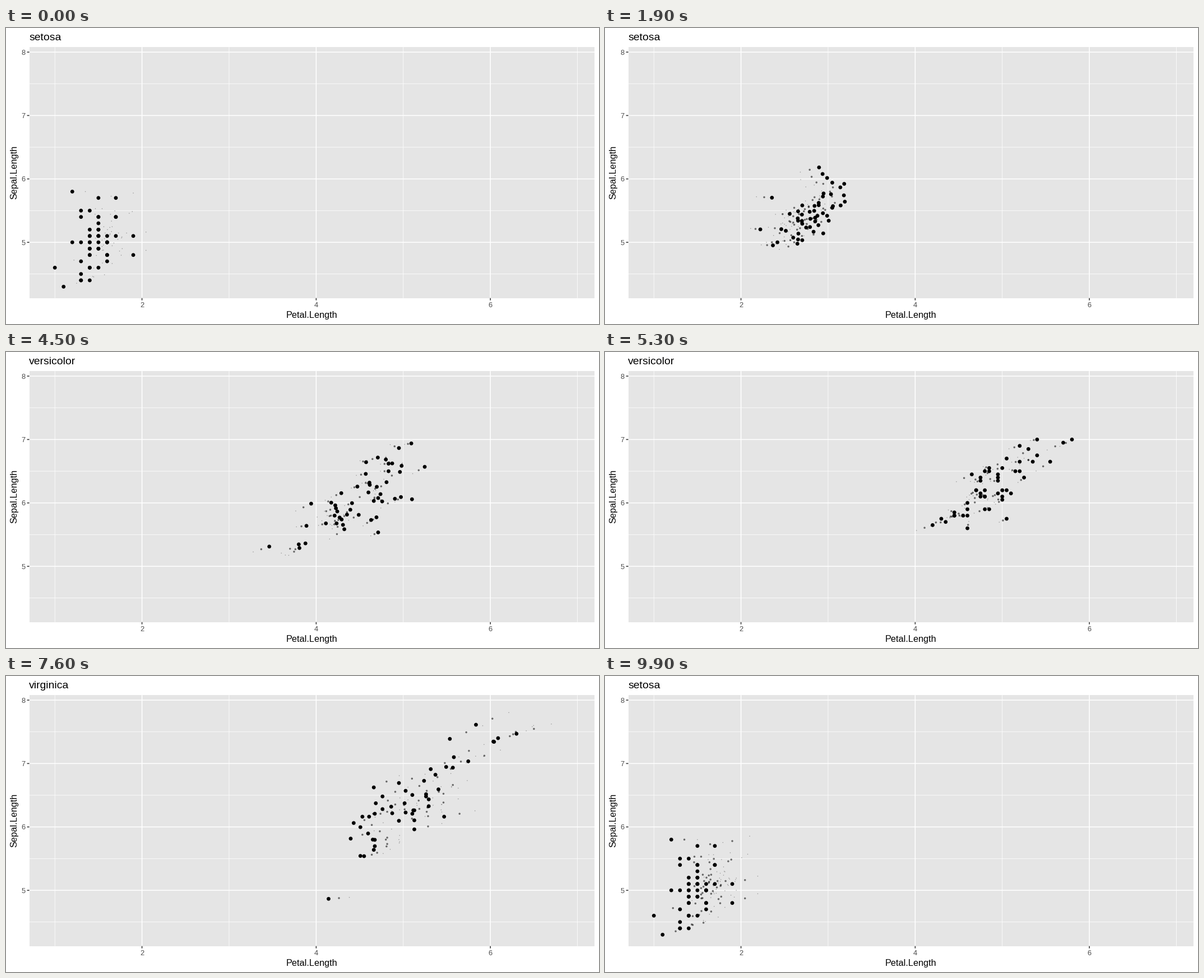
These frames come from a looping animation (1058 by 529 pixels, 10 s). A matplotlib script:

```python
import numpy as np
import matplotlib.pyplot as plt
from matplotlib.animation import FuncAnimation
from matplotlib.colors import to_rgba
from matplotlib.patches import Rectangle

W, H, DPI = 1058, 529, 128
FRAMES, INTERVAL = 100, 100
LEFT, RIGHT, TOP, BOTTOM = 41.6, 1049.9, 34.1, 482.7
PX = 72 / DPI  # points per pixel

# Lengths in millimetres, one row per flower
setosa_petal = [
    14, 14, 13, 15, 14, 17, 14, 15, 14, 15, 15, 16, 14, 11, 12, 15, 13,
    14, 17, 15, 17, 15, 10, 17, 19, 16, 16, 15, 14, 16, 16, 15, 15, 14,
    15, 12, 13, 14, 13, 15, 13, 13, 13, 16, 19, 14, 16, 14, 15, 14]
setosa_sepal = [
    51, 49, 47, 46, 50, 54, 46, 50, 44, 49, 54, 48, 48, 43, 58, 57, 54,
    51, 57, 51, 54, 51, 46, 51, 48, 50, 50, 52, 52, 47, 48, 54, 52, 55,
    49, 50, 55, 49, 44, 51, 50, 45, 44, 50, 51, 48, 51, 46, 53, 50]
versicolor_petal = [
    47, 45, 49, 40, 46, 45, 47, 33, 46, 39, 35, 42, 40, 47, 36, 44, 45,
    41, 45, 39, 48, 40, 49, 47, 43, 44, 48, 50, 45, 35, 38, 37, 39, 51,
    45, 45, 47, 44, 41, 40, 44, 46, 40, 33, 42, 42, 42, 43, 30, 41]
versicolor_sepal = [
    70, 64, 69, 55, 65, 57, 63, 49, 66, 52, 50, 59, 60, 61, 56, 67, 56,
    58, 62, 56, 59, 61, 63, 61, 64, 66, 68, 67, 60, 57, 55, 55, 58, 60,
    54, 60, 67, 63, 56, 55, 55, 61, 58, 50, 56, 57, 57, 62, 51, 57]
virginica_petal = [
    60, 51, 59, 56, 58, 66, 45, 63, 58, 61, 51, 53, 55, 50, 51, 53, 55,
    67, 69, 50, 57, 49, 67, 49, 57, 60, 48, 49, 56, 58, 61, 64, 56, 51,
    56, 61, 56, 55, 48, 54, 56, 51, 51, 59, 57, 52, 50, 52, 54, 51]
virginica_sepal = [
    63, 58, 71, 63, 65, 76, 49, 73, 67, 72, 65, 64, 68, 57, 58, 64, 65,
    77, 77, 60, 69, 56, 77, 63, 67, 72, 62, 61, 64, 72, 74, 79, 64, 63,
    61, 77, 63, 64, 60, 69, 67, 69, 58, 68, 67, 67, 63, 65, 62, 59]


def to_x(v):
    return 242.6 + 155.4 * (v - 2)


def to_y(v):
    return 383.0 - 113.3 * (v - 5)


def place(petal, sepal):
    return np.column_stack([to_x(np.array(petal) / 10),
                            to_y(np.array(sepal) / 10)])


names = ["setosa", "versicolor", "virginica"]
states = [place(setosa_petal, setosa_sepal),
          place(versicolor_petal, versicolor_sepal),
          place(virginica_petal, virginica_sepal)]
moves = [(6, 33), (40, 66), (73, 99)]  # first and last frame of each move


def progress(frame):
    """State being left, and how far the move to the next one has come."""
    for i, (start, end) in enumerate(moves):
        if frame <= end:
            return i, max(0, (frame - start) / (end - start))
    return 0, 0


def points(frame):
    i, t = progress(frame % FRAMES)
    return (1 - t) * states[i] + t * states[(i + 1) % 3]


plt.rcParams["font.family"] = "Liberation Sans"
fig = plt.figure(figsize=(W / DPI, H / DPI), dpi=DPI, facecolor="white")
ax = fig.add_axes([0, 0, 1, 1])
ax.set_xlim(0, W)
ax.set_ylim(H, 0)
ax.axis("off")


def line(xs, ys, color, width, z):
    ax.plot(xs, ys, color=color, lw=width * PX, zorder=z, snap=False,
            solid_capstyle="butt")


def label(x, y, text, size, color="black", **kw):
    return ax.text(x, y, text, fontsize=size * PX, color=color,
                   **{"va": "baseline", **kw})


ax.add_patch(Rectangle((LEFT, TOP), RIGHT - LEFT, BOTTOM - TOP,
                       fc="#e5e5e5", lw=0, zorder=0))

for v in (1, 3, 5, 7):
    line([to_x(v)] * 2, [TOP, BOTTOM], "white", 0.8, 1)
for v in (4.5, 5.5, 6.5, 7.5):
    line([LEFT, RIGHT], [to_y(v)] * 2, "white", 0.8, 1)
for v in (2, 4, 6):
    x = to_x(v)
    line([x, x], [TOP, BOTTOM], "white", 1.57, 2)
    line([x, x], [BOTTOM, BOTTOM + 4], "#333333", 1.57, 2)
    label(x, 499.2, str(v), 12.9, "#4d4d4d", ha="center")
for v in (5, 6, 7, 8):
    y = to_y(v)
    line([LEFT, RIGHT], [y, y], "white", 1.57, 2)
    line([LEFT - 4, LEFT], [y, y], "#333333", 1.57, 2)
    label(34.3, y + 4.6, str(v), 12.9, "#4d4d4d", ha="right")

label((LEFT + RIGHT) / 2, 517.6, "Petal.Length", 16.2, ha="center")
label(19.7, (TOP + BOTTOM) / 2, "Sepal.Length", 16.2, ha="right",
      va="center", rotation=90, rotation_mode="default").set(
          ha="center", va="center", x=14.6)
title = label(41.3, 22, names[0], 19.4)

# Two fading wake layers below the current points: radius in px, opacity
layers = [(0.75, 0.35), (1.75, 0.55), (3.4, 1)]
n = len(states[0])
sizes = np.repeat([(2 * r * PX) ** 2 for r, _ in layers], n)
colors = np.repeat([to_rgba("black", a) for _, a in layers], n, axis=0)


def trail(frame):
    return np.vstack([points(frame - lag) for lag in (2, 1, 0)])


dots = ax.scatter(*trail(0).T, s=sizes, c=colors, linewidths=0, zorder=3)


def update(frame):
    i, t = progress(frame)
    title.set_text(names[(i + (t > 0.5)) % 3])
    dots.set_offsets(trail(frame))
    return title, dots


anim = FuncAnimation(fig, update, frames=FRAMES, interval=INTERVAL,
                     init_func=lambda: update(0), repeat=True,
                     repeat_delay=0, blit=False)
plt.show()
```
